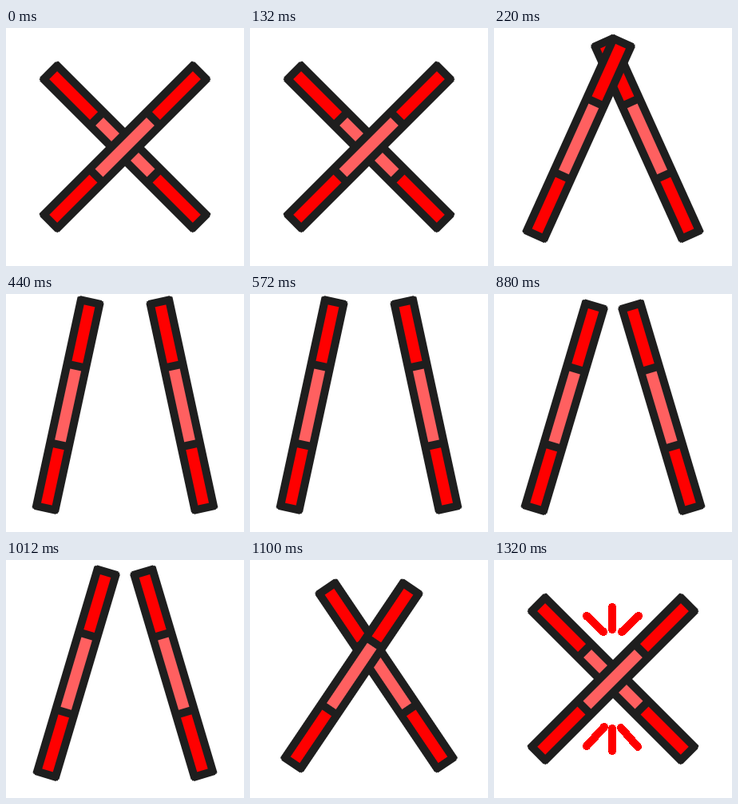
These frames come from a looping animation (298x298 px, 1540 ms). An HTML page:

```html
<!DOCTYPE html>
<html lang="en">
<head>
<meta charset="utf-8">
<title>Clashing sticks</title>
<style>
  html, body { margin: 0; width: 100%; height: 100%; overflow: hidden; background: #fff; }
  svg { display: block; width: 100vw; height: 100vh; shape-rendering: crispEdges; }
  .stick { fill: #f00; stroke: #1e1e1e; stroke-width: 10; stroke-linejoin: round; }
  .grip { fill: #ff6060; }
  .sparks { fill: none; stroke: #f00; stroke-width: 10; stroke-linecap: round; opacity: 0; }
</style>
</head>
<body>
<svg viewBox="0 0 298 298">
  <defs>
    <!-- the foot of the stick is the origin -->
    <g id="stick">
      <rect x="-12.25" y="-264" width="24.5" height="264"/>
      <rect class="grip" x="-12.25" y="-182.5" width="24.5" height="101"/>
    </g>
  </defs>
  <g transform="matrix(-1 0 0 1 298 0)"><g class="stick"><use href="#stick"/></g></g>
  <g class="stick"><use href="#stick"/></g>
  <path class="sparks" d="M148 59V87M116 70L137 90M181 70L160 90M148 211V239M138 209L116 233M159 210L180 234"/>
</svg>
<script>
  const STEP = 220;

  // key poses: tilt in degrees and height of the foot; the swing ends where it began
  const poses = [[45, 242.3], [24.3, 258.8], [12.2, 268], [5.35, 277.9], [16.6, 268.2], [34, 254.4]];
  poses.push(poses[0]);

  // the foot slides inwards as the stick tilts
  const place = ([tilt, y]) =>
    ({ transform: `translate(${47.6 + 0.18 * tilt}px, ${y}px) rotate(${tilt}deg)` });

  // hold every frame for one step, then jump to the next
  function playSteps(el, frames) {
    const held = [...frames, frames.at(-1)].map((frame, i) =>
      ({ ...frame, offset: i / frames.length, easing: 'steps(1, end)' }));
    el.animate(held, { duration: STEP * frames.length, iterations: Infinity }).startTime = 0;
  }

  document.querySelectorAll('.stick').forEach(el => playSteps(el, poses.map(place)));
  playSteps(document.querySelector('.sparks'),
    poses.map((_, i) => ({ opacity: i === poses.length - 1 ? 1 : 0 })));
</script>
</body>
</html>
```
